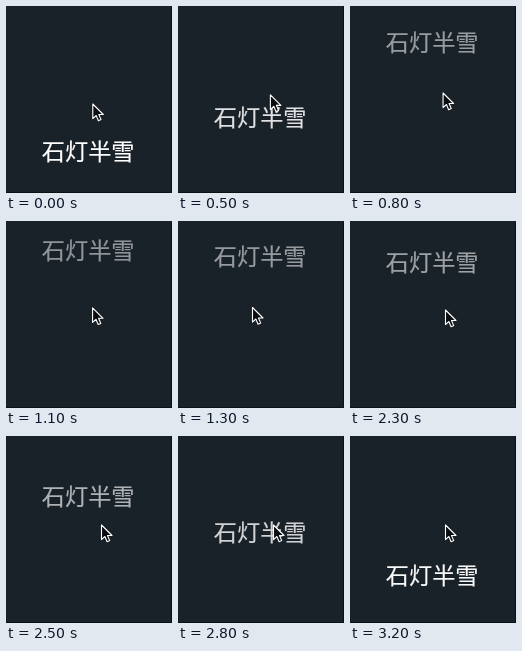
An HTML page that plays this animation: 166x187 px, repeating every 3300 ms.

```html
<!DOCTYPE html>
<html lang="zh-CN">
<head>
<meta charset="utf-8">
<style>
  html, body { margin: 0; width: 100%; height: 100%; overflow: hidden; background: #1a2229; }
  svg { display: block; width: 166px; height: 187px; }
  text {
    font: 23.2px "Noto Sans CJK SC", "Noto Sans CJK", "Noto Sans CJK JP", sans-serif;
    fill: #fff; stroke: #fff; stroke-width: .2px;
  }
</style>
</head>
<body>
<svg viewBox="0 0 166 187">
  <rect width="166" height="187" fill="#1a2229"/>
  <path d="M165.5 0V186.5H0" fill="none" stroke="#0c1117"/>
  <text id="label" x="82.2" text-anchor="middle">石灯半雪</text>
  <path id="pointer" d="M0 0V14.6L3.4 11.5L5.6 16.7L8.2 15.6L6 10.5H10.5Z"
        fill="#0b0d10" stroke="#fff" stroke-width="1.1" stroke-linejoin="round"/>
</svg>
<script>
  const LOOP = 3300, STEP = 100;
  const BOTTOM = 145, RELEASE = 97, OVERSHOOT = 24, TOP = 35.5;
  const label = document.getElementById('label');
  const pointer = document.getElementById('pointer');

  const linear = p => p;
  const easeIn = p => p * p;
  const easeOut = p => 1 - (1 - p) ** 2;
  const fling = p => 1 - (1 - p) ** 2.6;
  const softInOut = p => (p + (1 - Math.cos(Math.PI * p)) / 2) / 2;

  const mix = (a, b, p) => a + (b - a) * p;

  // Eased progress of t through a time span, held at both ends
  const progress = (t, from, to, ease) =>
    ease(Math.min(1, Math.max(0, (t - from) / (to - from))));

  function labelY(t) {
    if (t < 600) return mix(BOTTOM, RELEASE, progress(t, 0, 600, easeIn));
    if (t < 1000) return mix(RELEASE, OVERSHOOT, progress(t, 600, 1000, fling));
    if (t < 2200) return mix(OVERSHOOT, TOP, progress(t, 1000, 1400, easeOut));
    return mix(TOP, BOTTOM, progress(t, 2200, LOOP, softInOut));
  }

  // Drag up, drift left, dip down, return for the drag down
  function pointerAt(t) {
    const up = progress(t, 0, 600, linear);
    const left = progress(t, 600, 1300, p => p ** 3);
    const dip = progress(t, 1300, 1600, linear);
    const back = progress(t, 1700, 2100, easeOut);
    return [
      86.8 + 6.7 * up - 19 * left + 8.5 * dip + 12.5 * back,
      98 - 11 * up - 0.5 * left + 14.5 * dip - 12 * back
    ];
  }

  function draw(elapsed) {
    const t = Math.floor((elapsed % LOOP) / STEP) * STEP;
    const y = labelY(t);
    label.setAttribute('y', y + 8.8);
    label.setAttribute('opacity', mix(0.55, 1, (y - TOP) / (BOTTOM - TOP)));
    pointer.setAttribute('transform', `translate(${pointerAt(t)})`);
  }

  const start = performance.now();
  function tick() {
    draw(performance.now() - start);
    requestAnimationFrame(tick);
  }
  tick();
</script>
</body>
</html>
```
